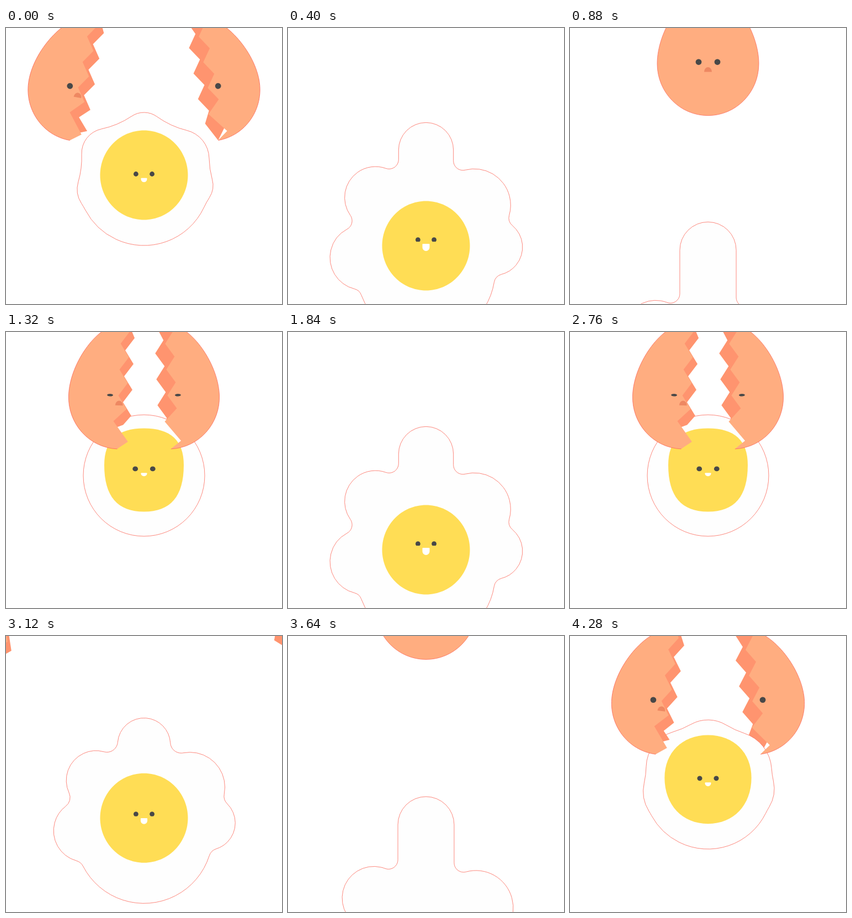
Recreate the animation shown at these times as an HTML page with a canvas. Size 500 px wide and 500 px high, loop 4.32 s.

```html
<!DOCTYPE html>
<html>
<head>
<meta charset="utf-8">
<title>Cracking egg</title>
<style>
html, body { margin: 0; width: 100%; height: 100%; overflow: hidden; background: #fff; }
canvas { display: block; width: 500px; height: 500px; }
</style>
</head>
<body>
<canvas id="stage" width="500" height="500"></canvas>
<script>
const ctx = document.getElementById('stage').getContext('2d');
const CYCLE = 1440, STEP = 40;
const CRACK = -310, SPREAD = -120; // ms before the egg white starts to drip
const GRAVITY = .00035;
const SHELL = '#ffad80', INNER = '#ff946f', BEAK = '#ee8862';
const INK = '#484848', YOLK = '#ffdd55', LINE = '#fb6a5c';

const clamp = x => Math.min(1, Math.max(0, x));
const mix = (a, b, f) => a + (b - a) * f;
const easeOut = x => 1 - (1 - clamp(x)) ** 2;
const easeInOut = x => (1 - Math.cos(Math.PI * clamp(x))) / 2;
const fall = (y, speed, t) => y + speed * t + GRAVITY * t * t;

const emerged = t => easeOut((t - CRACK) / (SPREAD - CRACK));
const roundness = t => clamp(t / SPREAD);

// Shell motion
const gap = t => t < SPREAD ? 45 * emerged(t) : 118 + 1.02 * t + (t < 0 ? .0034 : -.0016) * t * t;
const tilt = t => Math.max(0, 10 + t / 16) * Math.PI / 180;
function shellY(t) {
  if (t < SPREAD) return mix(-141, 118, easeInOut((t + 840) / 400));
  return 111 - .346 * t - (t < 0 ? .0024 * t * t : 0);
}
const eyeOpen = t => 2.3 + 3 * Math.max(clamp((t - SPREAD) / 80), clamp((CRACK + 50 - t) / 60));

const egg = new Path2D('M-92 0C-92 52-51 94 0 94S92 52 92 0C92-60 43-133 0-133S-92-60-92 0Z');
const crack = [[0, -150]];
for (let y = -120; y < 0; y += 47) crack.push([14, y], [-2, y + 23]);
crack.push([14, 21], [-9, 44], [19, 80], [0, 94], [0, 99]);

// Round lobes of the egg white, clockwise; each drips at its own speed
const body = { x: 0, y: 274, r: 120, speed: .275, spread: 0, grow: .05 };
const lobes = [
  { x: 0, y: 193, r: 40, speed: -.07, spread: 0, grow: .28, neck: true },
  { x: 65, y: 237, r: 53, speed: .07, spread: .4, grow: .28 },
  { x: 84, y: 285, r: 41, speed: .14, spread: .55, grow: .28 },
  body,
  { x: -74, y: 292, r: 47, speed: .17, spread: .65, grow: .28 },
  { x: -68, y: 227, r: 45, speed: .06, spread: .4, grow: .28 },
];

function lobeAt(lobe, t) {
  const { x, y, r, neck } = lobe;
  if (t < 0) {
    const s = roundness(t);
    return { x: 250 + x * (1 - s), y: mix(y, 260, s), r: mix(r, 110, s), neck };
  }
  const e = 1 - Math.exp(-t / 200);
  return {
    x: 250 + x * (1 + lobe.spread * e),
    y: fall(y, lobe.speed, t),
    r: r * (1 + lobe.grow * e),
    neck
  };
}

// Hollow arc of radius f that touches circles a and b from outside
function joint(a, b, f) {
  const dx = b.x - a.x, dy = b.y - a.y, d = Math.hypot(dx, dy);
  const ra = a.r + f, rb = b.r + f;
  const along = (d * d + ra * ra - rb * rb) / (2 * d);
  const out = Math.sqrt(Math.max(0, ra * ra - along * along));
  let x = a.x + (dx * along + dy * out) / d;
  let y = a.y + (dy * along - dx * out) / d;
  const neck = [a, b].find(c => c.neck);
  // below its cap the neck has straight sides
  if (neck && y > neck.y) {
    const other = neck === a ? b : a;
    x = neck.x + Math.sign(other.x - neck.x) * (neck.r + f);
    y = other.y - Math.sqrt((other.r + f) ** 2 - (other.x - x) ** 2);
  }
  const angle = c => Math.atan2(y - (c.neck ? Math.max(c.y, y) : c.y), x - c.x);
  return { x, y, f, from: angle(a), to: angle(b) };
}

function whitePath(t) {
  ctx.beginPath();
  if (t <= SPREAD) {
    const k = emerged(t);
    ctx.arc(250, mix(150, 260, k), mix(44, 110, k), 0, 7);
    return;
  }
  const f = 17 + 140 * Math.exp(-Math.max(0, t) / 60);
  const circles = lobes.map(lobe => lobeAt(lobe, t)), n = circles.length;
  const joints = circles.map((c, i) => joint(c, circles[(i + 1) % n], f));
  circles.forEach((c, i) => {
    const next = joints[i];
    ctx.arc(c.x, c.y, c.r, joints[(i + n - 1) % n].to, next.from);
    ctx.arc(next.x, next.y, f, next.from + Math.PI, next.to + Math.PI, true);
  });
  ctx.closePath();
}

function outline(path) {
  ctx.strokeStyle = LINE;
  ctx.lineWidth = .8;
  path ? ctx.stroke(path) : ctx.stroke();
}

function polygon(pts) {
  ctx.beginPath();
  pts.forEach(p => ctx.lineTo(...p));
  ctx.closePath();
}

function oval(x, y, rx, ry, color) {
  ctx.fillStyle = color;
  ctx.beginPath();
  ctx.ellipse(x, y, rx, ry, 0, 0, 7);
  ctx.fill();
}

function eggWhite(t) {
  whitePath(t);
  ctx.fillStyle = '#fefefe';
  ctx.fill();
  outline();
}

function yolk(t) {
  const s = roundness(t), k = emerged(t), drip = Math.max(0, t);
  const y = mix(120, fall(266.5, .18, t), k);
  const size = mix(.6, 1, k), rx = (79.5 - 7.5 * s * s) * size, ry = (81 - 5.5 * s * s) * size;
  const curve = mix(.5523, .67, s), waist = y - 9 * s;

  ctx.fillStyle = YOLK;
  ctx.beginPath();
  ctx.moveTo(250, y - ry);
  for (const [side, v] of [[1, -1], [1, 1], [-1, 1], [-1, -1]]) {
    const pole = y + v * ry, hx = 250 + side * rx * curve, hy = waist + (pole - waist) * curve;
    const edge = 250 + side * rx;
    if (side * v < 0) ctx.bezierCurveTo(...(v < 0 ? [hx, pole, edge, hy, edge, waist] : [hx, pole, edge, hy, edge, waist]));
    else ctx.bezierCurveTo(edge, hy, hx, pole, 250, pole);
  }
  ctx.fill();

  const eye = y - 2 - .022 * drip, smile = clamp(drip / 400);
  for (const side of [-1, 1]) {
    const x = 250 + side * (14.6 + 1.2 * s);
    oval(x, eye, 4.4 + .5 * s, 4.4, INK);
    oval(x, eye + 4.6, 2.6 * smile, 1.3 * smile, YOLK);
  }
  const w = 11 + 2 * smile, h = 7.5 + 5.5 * smile - 1.5 * s, r = Math.min(w / 2, h - 1);
  ctx.fillStyle = '#fff';
  ctx.beginPath();
  ctx.roundRect(250 - w / 2, eye + 7.3, w, h, [1, 1, r, r]);
  ctx.fill();
}

function paintEgg(t, sides) {
  ctx.fillStyle = SHELL;
  ctx.fill(egg);
  outline(egg);
  for (const side of sides) oval(side * 17, -3, 5.4, eyeOpen(t), INK);
  if (sides.includes(-1)) {
    ctx.fillStyle = BEAK;
    ctx.beginPath();
    ctx.ellipse(0, 15, 7, 8.5, 0, Math.PI, 0);
    ctx.fill();
  }
}

// side is -1 for the left half, 1 for the right
function inHalf(t, side, paint) {
  ctx.save();
  ctx.translate(250 + side * gap(t), shellY(t));
  ctx.rotate(-side * tilt(t));
  paint();
  ctx.restore();
}

function innerShell(t, side) {
  const left = side < 0, open = clamp(gap(t) / 45), wide = 1 - roundness(t);
  const dx = (left ? 9 + 4 * wide : -19 - 2 * wide) * open;
  const dy = (left ? 12 : 17) * open;
  const foot = [mix(9, 28, wide), mix(50, 72, wide)];
  const end = left ? [[9, 50], foot, [foot[0] - 12, foot[1] + 5]] : [[-18, 60], [0, 94]];
  inHalf(t, side, () => {
    ctx.clip(egg);
    polygon([
      ...crack.slice(0, 8).map(([x, y]) => [x + dx, y + dy]), ...end,
      [side * 25, 60], [side * 25, -150]]);
    ctx.fillStyle = INNER;
    ctx.fill();
  });
}

function outerShell(t, side) {
  inHalf(t, side, () => {
    polygon([...crack, [side * 200, 150], [side * 200, -200]]);
    ctx.clip();
    paintEgg(t, [side]);
  });
}

function drawEgg(t) {
  const shell = t > -840 && t < 320;
  if (t <= CRACK) {
    if (shell) inHalf(t, 1, () => paintEgg(t, [-1, 1]));
    return;
  }
  if (shell) innerShell(t, 1);
  eggWhite(t);
  yolk(t);
  if (shell) {
    innerShell(t, -1);
    outerShell(t, -1);
    outerShell(t, 1);
  }
}

const start = performance.now();
function frame() {
  const t = Math.floor((performance.now() - start) / STEP) * STEP % CYCLE;
  ctx.fillStyle = '#fff';
  ctx.fillRect(0, 0, 500, 500);
  drawEgg(t);
  drawEgg(t - CYCLE);
  requestAnimationFrame(frame);
}
frame();
</script>
</body>
</html>
```
